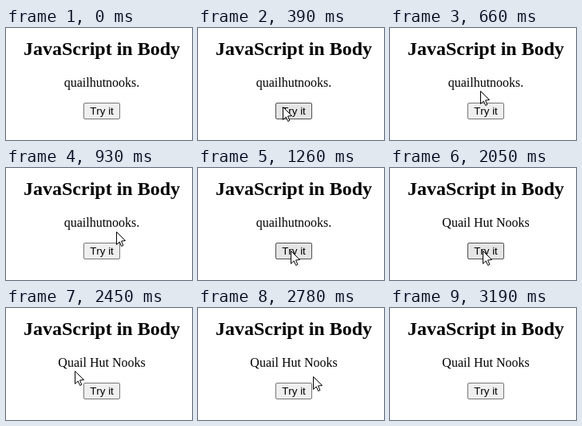
An HTML page with a canvas for the animation above (3.79 s loop, 233 by 141 pixels).

```html
<!DOCTYPE html>
<html lang="en">
<head>
<meta charset="utf-8">
<title>JavaScript in Body</title>
<style>
  html, body { margin: 0; width: 100%; height: 100%; overflow: hidden; background: #fff; }
  .stage { position: absolute; left: 0; top: 0; width: 233px; height: 141px; overflow: hidden; color: #000; }
  h2, p { position: absolute; left: 0; width: 240px; margin: 0; text-align: center; white-space: nowrap;
    font-family: "Liberation Serif", "Times New Roman", serif; }
  h2 { top: 13px; font-size: 24px; line-height: 26px; font-weight: bold; }
  p { top: 60px; font-size: 16px; line-height: 18px; }
  .button { position: absolute; left: 97px; top: 94px; width: 46px; height: 21px; box-sizing: border-box;
    padding-top: 2px; border: 1px solid #767676; border-radius: 2px; background: #efefef; text-align: center;
    font: 13.333px/15px "Liberation Sans", Arial, sans-serif; font-kerning: none; white-space: nowrap; }
  .hover { background: #e5e5e5; border-color: #4f4f4f; }
  .pressed { background: #f5f5f5; border-color: #8d8d8d; }
  canvas { position: absolute; left: 0; top: 0; }
</style>
</head>
<body>
<div class="stage">
  <h2>JavaScript in Body</h2>
  <p id="message">quailhutnooks.</p>
  <div id="button" class="button">Try it</div>
  <canvas id="overlay" width="233" height="141"></canvas>
</div>
<script>
  const LOOP = 3790, ENTER = 260, PRESS = 1920, RELEASE = 2050, LEAVE = 3190;
  const STEP = 66.4, FIRST = 257; // the pointer moves about 15 times a second
  const message = document.getElementById('message');
  const button = document.getElementById('button');
  const ctx = document.getElementById('overlay').getContext('2d');
  const arrow = new Path2D('M.5 .5V16.5L4.2 13L6.7 18.5L8.9 17.5L6.5 12L11.5 11.5Z');

  // Turning points of the pointer's path
  const path = [
    { t: 260, x: 142, y: 127 },
    { t: 535, x: 79, y: 79 },
    { t: 785, x: 137, y: 79 },
    { t: 920, x: 138, y: 80 },
    { t: 1250, x: 116, y: 104 },
    { t: 2250, x: 116, y: 104 },
    { t: 2520, x: 80, y: 74 },
    { t: 2845, x: 152, y: 87 },
    { t: 2925, x: 152, y: 87 },
    { t: 3190, x: 168, y: 143 }
  ];

  const easeOut = u => 1 - Math.pow(1 - u, 1.35);

  function pointerAt(time) {
    const t = Math.max(ENTER, FIRST + Math.floor((time - FIRST) / STEP) * STEP);
    const next = path.findIndex(p => p.t > t);
    const a = path[next - 1], b = path[next];
    const k = easeOut((t - a.t) / (b.t - a.t));
    return { x: Math.round(a.x + (b.x - a.x) * k), y: Math.round(a.y + (b.y - a.y) * k) };
  }

  function drawPointer({ x, y }) {
    ctx.save();
    ctx.translate(x, y);
    ctx.fillStyle = '#fff';
    ctx.strokeStyle = '#000';
    ctx.fill(arrow);
    ctx.stroke(arrow);
    ctx.restore();
  }

  function drawClick({ x, y }) {
    ctx.fillStyle = 'rgba(255, 245, 0, .52)';
    ctx.beginPath();
    ctx.arc(x - .5, y, 15, 0, Math.PI * 2);
    ctx.fill();
  }

  function overButton({ x, y }) {
    return x >= 97 && x < 143 && y >= 94 && y < 115;
  }

  function render(t) {
    const visible = t >= ENTER && t < LEAVE;
    const pressed = t >= PRESS && t < RELEASE;
    const pointer = visible ? pointerAt(t) : null;
    const state = pressed ? ' pressed' : visible && overButton(pointer) ? ' hover' : '';

    message.textContent = t < RELEASE ? 'quailhutnooks.' : 'Quail Hut Nooks';
    button.className = 'button' + state;

    ctx.clearRect(0, 0, 233, 141);
    if (visible) drawPointer(pointer);
    if (pressed) drawClick(pointer);
  }

  const start = performance.now();
  function tick() {
    render((performance.now() - start) % LOOP);
    requestAnimationFrame(tick);
  }
  tick();
</script>
</body>
</html>
```
